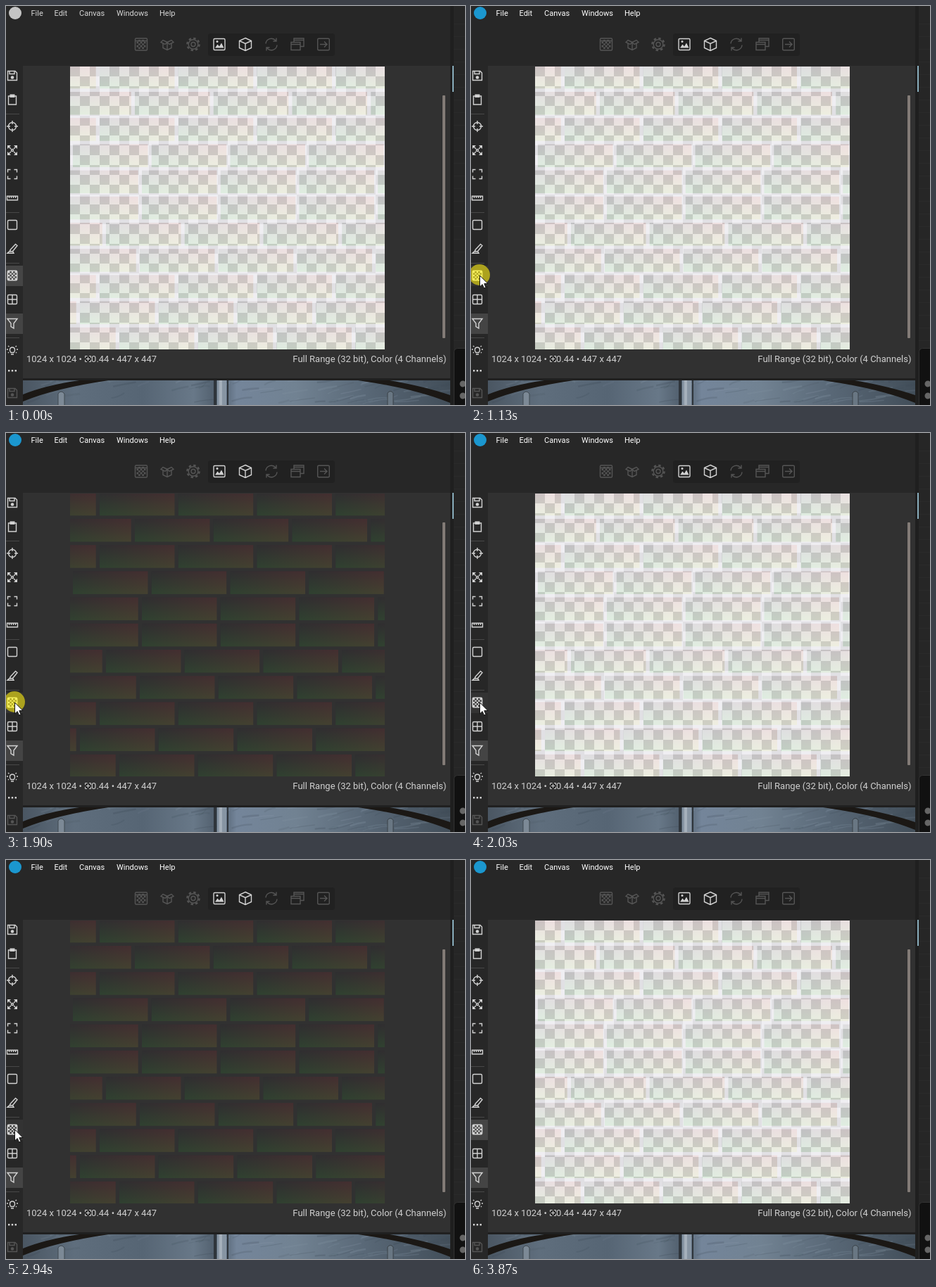
Write an HTML page with a canvas that moves like this. It is 652 by 567 pixels and loops after 4420 ms.

```html
<!DOCTYPE html>
<html lang="en">
<head>
<meta charset="utf-8">
<title>Transparency toggle</title>
<style>
html, body { margin: 0; width: 100%; height: 100%; overflow: hidden; background: #272727; }
#stage { position: relative; width: 652px; height: 567px; overflow: hidden; }
#stage > * { position: absolute; left: 0; top: 0; }
text { font-family: Roboto, Arial, sans-serif; }
.icon { fill: none; stroke: #d2d2d2; stroke-width: 1.4; }
.icon .solid { fill: #d2d2d2; stroke: none; }
.dim .icon { stroke: #555; }
.dim .icon .solid { fill: #555; }
#menu { font-size: 11px; fill: #d6d6d6; }
#logo { fill: #c4c4c4; }
.focused #menu { fill: #fff; }
.focused #logo { fill: #1b97cf; }
#toggle { fill: #454545; }
.hover #toggle { fill: #393939; }
.focused.hover #toggle { fill: #333; }
#spot { fill: #aca21e; visibility: hidden; }
.press #spot { visibility: visible; }
.press #checker .icon { stroke: #f4ee5c; }
.press #checker .solid { fill: #f4ee5c; }
</style>
</head>
<body>
<div id="stage">
  <svg id="ui" width="652" height="567">
    <defs>
      <linearGradient id="water">
        <stop offset="0" stop-color="#4a5662"/>
        <stop offset=".12" stop-color="#5f6e7d"/>
        <stop offset=".28" stop-color="#566574"/>
        <stop offset=".4" stop-color="#687888"/>
        <stop offset=".46" stop-color="#4d5b69"/>
        <stop offset=".5" stop-color="#74859a"/>
        <stop offset=".64" stop-color="#718292"/>
        <stop offset=".8" stop-color="#596877"/>
        <stop offset="1" stop-color="#424e59"/>
      </linearGradient>
      <clipPath id="strip"><path d="M24 532H631V567H24Z"/></clipPath>
    </defs>
    <path fill="#313131" d="M24 85H631V529H24Z"/>
    <path fill="#202020" d="M24 529H631V532H24Z"/>

    <g clip-path="url(#strip)">
      <path fill="url(#water)" d="M24 532H631V567H24Z"/>
      <g id="streaks" fill="none"/>
      <g fill="#1b1815">
        <path d="M24 562Q70 543 146 532H104Q56 539 24 552Z"/>
        <path d="M500 532H545Q596 541 631 553V564Q580 543 500 532Z"/>
      </g>
      <path fill="#2f353b" d="M295 532h4v35h-4zM314 532h2v35h-2z"/>
      <path fill="#8795a3" d="M300 532h13v35h-13z"/>
      <path fill="#a5b0bb" d="M303 532h4v35h-4z"/>
      <path fill="#7c8996" stroke="#3f484f" d="M74 570V551q4-6 9 0V570Z"/>
      <path fill="#697783" stroke="#3a4249" d="M542 570V550q4-5 8 0V570Z"/>
    </g>

    <path fill="#1f1f1f" d="M631 0H636V567H631Z"/>
    <path fill="#262626" d="M636 0H652V567H636Z"/>
    <path id="rows" stroke="#2b2b2b"/>
    <path fill="#88adbb" d="M634 85h2v37h-2z"/>
    <rect x="636.5" y="486.5" width="30" height="90" rx="5" fill="#111" stroke="#333"/>
    <g fill="#666"><circle cx="649" cy="537" r="4.5"/><circle cx="649" cy="554" r="4.5"/></g>
    <rect x="620" y="127" width="4" height="345" rx="1" fill="#827b76"/>

    <circle id="logo" cx="13" cy="10" r="9"/>
    <g id="menu">
      <text x="35.5" y="14">File</text><text x="68.5" y="14">Edit</text>
      <text x="104" y="14">Canvas</text><text x="157" y="14">Windows</text>
      <text x="218" y="14">Help</text>
    </g>
    <rect x="287" y="39" width="180" height="32" rx="4" fill="#212121"/>
    <path fill="#444" d="M0 437H24V466H0Z"/>
    <path id="toggle" d="M0 369H24V398H0Z"/>
    <path stroke="#484848" d="M0 153.5H19M0 293.5H19M0 365.5H19M0 471.5H19"/>
    <circle id="spot" cx="12" cy="382" r="15"/>
    <g id="icons"></g>

    <g font-size="13" fill="#cfcfcf">
      <text x="29" y="506">1024 x 1024 •</text>
      <text x="214" y="506" text-anchor="end">0.44 • 447 x 447</text>
      <text x="625.5" y="506" text-anchor="end">Full Range (32 bit), Color (4 Channels)</text>
    </g>
    <path fill="none" stroke="#cfcfcf" d="M112.5 500v-2.5h3M118 497.5h2.5v2.5M120.5 503v2.5h-2.5M115 505.5h-2.5v-2.5M114 501.5h5M116.5 499v5"/>
  </svg>
  <canvas id="plain" width="447" height="402" style="left:91px;top:86px"></canvas>
  <canvas id="checked" width="447" height="402" style="left:91px;top:86px"></canvas>
  <svg width="652" height="567">
    <path id="cursor" fill="#fff" stroke="#111" d="M0 0V16L3.7 12.6 6 18 8.6 16.9 6.3 11.6H11.5Z"/>
  </svg>
</div>
<script>
const $ = id => document.getElementById(id);
const stage = $('stage');

// Icons, drawn around their own centre
const dots = (n, step, odd) => {
  let d = '';
  for (let r = 0; r < n; r++) for (let c = 0; c < n; c++)
    if ((r + c) % 2 === odd) d += `M${(c - n / 2) * step} ${(r - n / 2) * step}h${step}v${step}h-${step}z`;
  return `<path class="solid" d="${d}"/>`;
};
const line = d => `<path d="${d}"/>`;
const box = s => `<rect x="${-s}" y="${-s}" width="${2 * s}" height="${2 * s}" rx="1.5"/>`;
const solid = d => `<path class="solid" d="${d}"/>`;
const art = {
  save: line('M-6.5-6.5H4L6.5-4V6.5H-6.5ZM-4-6V-2.5H3V-6') + '<circle class="solid" cy="2.5" r="2.3"/>',
  clip: line('M-5.5-5H5.5V7H-5.5Z') + solid('M-3.5-7.5H3.5V-3H-3.5Z'),
  target: '<circle r="5.5"/>' + line('M0-8V-3M0 8V3M-8 0H-3M8 0H3'),
  expand: solid('M-7-7H-2L-7-2ZM7-7V-2L2-7ZM7 7H2L7 2ZM-7 7V2L-2 7Z') + line('M-5-5L-2-2M5-5L2-2M5 5L2 2M-5 5L-2 2') + box(1.5),
  corners: line('M-6.5-2.5V-6.5H-2.5M2.5-6.5H6.5V-2.5M6.5 2.5V6.5H2.5M-2.5 6.5H-6.5V2.5'),
  ruler: line('M-7.5-2.7H7.5V2.7H-7.5ZM-4.5-3V0M-1.5-3V0M1.5-3V0M4.5-3V0'),
  square: box(6.5),
  brush: line('M-3 1.5L4.5-6.5L7-4.5L.5 3.5L-3 4ZM-3 2.5L-7 6.3H2L.5 3.5'),
  checker: box(6.7) + dots(5, 2.4, 0),
  grid: box(6.5) + line('M0-6V6M-6 0H6'),
  filter: line('M-7-6.5H7L2 0V7L-2 4.5V0Z'),
  bulb: line('M-2 3.5C-5 0-3.5-4 0-4S5 0 2 3.5ZM-2 6H2M-8-1H-6M8-1H6M-6-6L-4.5-4.8M6-6L4.5-4.8M-6 4L-5 3M6 4L5 3'),
  more: solid('M-6-1h2.4v2.4h-2.4zM-1.2-1h2.4v2.4h-2.4zM3.6-1h2.4v2.4h-2.4z'),
  material: box(8.5) + dots(5, 2.6, 1) + line('M-8-5H8'),
  openBox: line('M-6-1V5L0 8L6 5V-1M0-3V8M0-3L-6-6L-9-3L-3 0ZM0-3L6-6L9-3L3 0Z'),
  gear: '<circle r="6.8"/><circle r="3"/><circle r="8.6" stroke-width="2.4" stroke-dasharray="3.4 3.35"/>',
  image: box(8) + solid('M-6 5L-2.5 0L0 3L3-2L6.5 5Z') + '<circle class="solid" cx="-3" cy="-4" r="1.5"/>',
  cube: line('M0-9L8.5-5V5L0 9L-8.5 5V-5ZM-8.5-5L0-1L8.5-5M0-1V9'),
  sync: line('M-8-1A8 8 0 0 1 6-5.5M8 1A8 8 0 0 1-6 5.5M7-9V-4.5H2.5M-7 9V4.5H-2.5'),
  windows: line('M-9-3H4V8H-9ZM-9 0H4M-5-3V-8.5H9V3H4M-5-6H9'),
  send: box(8.3) + line('M-5 0H4.5M1-4L5 0L1 4')
};
const place = (name, x, y, dim) =>
  `<g ${name === 'checker' ? 'id="checker"' : ''} class="${dim ? 'dim' : ''}"><g class="icon" transform="translate(${x} ${y})">${art[name]}</g></g>`;
const side = { save: 99, clip: 133, target: 171, expand: 205, corners: 239, ruler: 273, square: 311,
  brush: 345, checker: 383, grid: 417, filter: 451, bulb: 489, more: 518 };
const tools = ['material', 'openBox', 'gear', 'image', 'cube', 'sync', 'windows', 'send'];
$('icons').innerHTML =
  Object.entries(side).map(([name, y]) => place(name, 9, y)).join('') +
  tools.map((name, i) => place(name, 192 + 37 * i, 54.5, i < 3 || i > 4)).join('') +
  place('save', 9, 550, true);

let rows = '';
for (let y = 25; y < 486; y += 18) rows += `M636 ${y}.5H652`;
$('rows').setAttribute('d', rows);

// Soft streaks in the lower view
let seed = 7;
const rand = () => (seed = seed * 16807 % 2147483647) / 2147483647;
let streaks = '';
for (let i = 0; i < 70; i++) {
  const x = 30 + rand() * 590, y = 533 + rand() * 33, w = 10 + rand() * 28;
  streaks += `<path stroke="${rand() < .5 ? '#3a4753' : '#8b9cac'}" opacity="${.08 + rand() * .17}" stroke-width="${1 + rand() * 2}" d="M${x} ${y}q${w / 2} ${-rand() * 6} ${w} ${-rand() * 9}"/>`;
}
$('streaks').innerHTML = streaks;

// Brick texture: red grows to the right, green grows downward
const starts = [133, 183, 133, 95, 193, 193, 142, 190, 133, 105, 161];
const pitch = 447 / 4, brickW = 106.5, brickH = 32.5;
function eachBrick(fn) {
  starts.forEach((s, r) => {
    for (let k = -2; k < 5; k++) fn(s - 91 + k * pitch, -1.2 + r * 37.2);
  });
}
function addGradient(g, x, y, dx, dy, colour) {
  const grad = g.createLinearGradient(x, y, x + dx, y + dy);
  grad.addColorStop(0, '#000');
  grad.addColorStop(1, colour);
  g.fillStyle = grad;
  g.fillRect(x, y, brickW, brickH);
}
function checks(g, alpha) {
  g.fillStyle = `rgba(0,0,0,${alpha})`;
  for (let r = 0; r < 29; r++) for (let c = 0; c < 32; c++)
    if ((r + c) % 2 === 0) g.fillRect(c * 14, r * 14, 14, 14);
}
function paint(id, ground, base, red, green, mortarDark, brickDark) {
  const g = $(id).getContext('2d');
  g.fillStyle = ground;
  g.fillRect(0, 0, 447, 402);
  checks(g, mortarDark);
  g.beginPath();
  eachBrick((x, y) => {
    g.fillStyle = base;
    g.fillRect(x, y, brickW, brickH);
    g.globalCompositeOperation = 'lighter';
    addGradient(g, x, y, brickW, 0, red);
    addGradient(g, x, y, 0, brickH, green);
    g.globalCompositeOperation = 'source-over';
    g.rect(x, y, brickW, brickH);
  });
  g.clip();
  checks(g, brickDark);
}
paint('plain', '#313131', 'rgb(47,46,48)', 'rgb(21,0,0)', 'rgb(0,19,0)', 0, 0);
paint('checked', '#efeef2', 'rgb(222,221,224)', 'rgb(17,2,0)', 'rgb(0,16,0)', .06, .13);

// Cursor stops: [time, x, y]
const stops = [];
for (let i = 0; i < 12; i++) {
  const p = i / 11, u = p * p * (3 - 2 * p), v = 1 - u;
  stops.push([100 + 500 * p, 335 * v * v + 200 * u * v + 17 * u * u, 535 * v * v + 610 * u * v + 376 * u * u]);
}
stops.push([630, 18, 379], [670, 18, 382], [830, 17, 382], [870, 16, 382], [910, 14, 383],
  [950, 13, 383], [990, 12.5, 383], [3740, 40, 399], [3785, 130, 448], [3830, 263, 521], [3870, 700, 600]);
const presses = [[1030, 1160], [1900, 2030], [2820, 2940], [3410, 3530]];
const cursor = $('cursor'), checked = $('checked');

function draw(t) {
  let x = 700, y = 600;
  for (const s of stops) if (s[0] <= t + .01) [, x, y] = s;
  cursor.setAttribute('transform', `translate(${x} ${y})`);
  const flips = presses.filter(p => t >= p[1]).length;
  checked.style.visibility = flips % 2 ? 'hidden' : 'visible';
  stage.classList.toggle('press', presses.some(p => t >= p[0] && t < p[1]));
  stage.classList.toggle('focused', t >= presses[0][0]);
  stage.classList.toggle('hover', x < 24 && y > 368 && y < 398);
}
const begin = performance.now();
function tick() {
  draw((performance.now() - begin) % 4420);
  requestAnimationFrame(tick);
}
tick();
</script>
</body>
</html>
```
